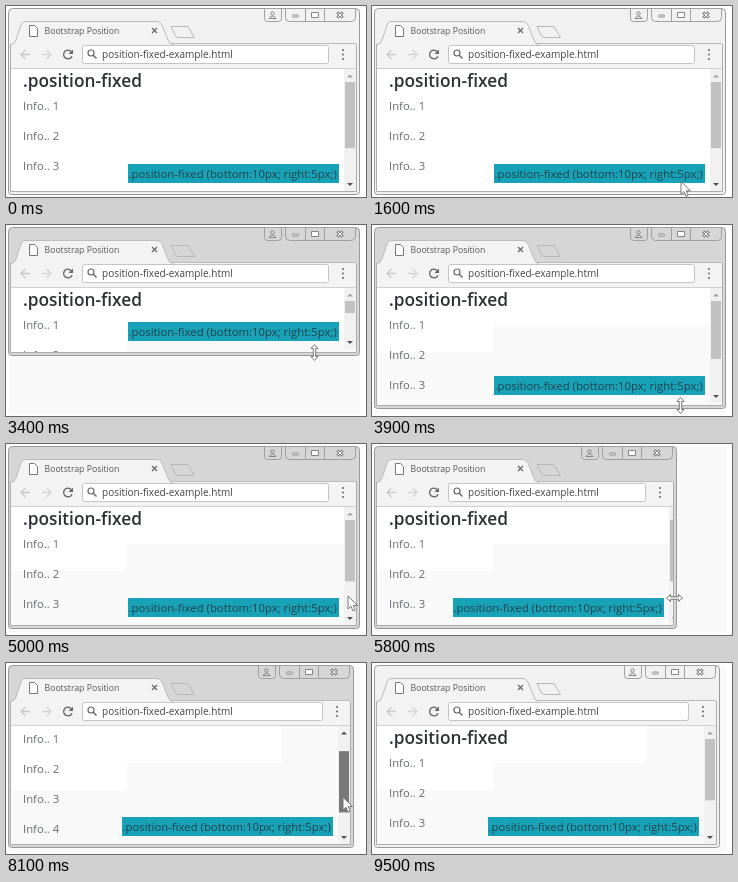
Recreate the animation shown at these times as an HTML page with a canvas. Size 360 by 191 pixels, loop 9600 ms.

```html
<!DOCTYPE html>
<html lang="en">
<head>
<meta charset="utf-8">
<title>Fixed position demo</title>
<style>
  html, body { margin: 0; width: 100%; height: 100%; overflow: hidden; background: #fff; }
  canvas { display: block; width: 100vw; height: 100vh; }
</style>
</head>
<body>
<canvas id="stage"></canvas>
<script>
const LOOP = 9600, STEP = 100, LAG = 40;
const STAGE_W = 360, STAGE_H = 191;
const FONT = '"Open Sans", "Noto Sans", sans-serif';
const OFF_WHITE = '#f9f9f9';
const canvas = document.getElementById('stage');
const ctx = canvas.getContext('2d');
const scale = Math.max(1, window.devicePixelRatio || 1);
canvas.width = STAGE_W * scale;
canvas.height = STAGE_H * scale;

// Smooth move from a to b between two times, at rest outside them.
function glide(t, start, end, a, b) {
  const u = Math.min(1, Math.max(0, (t - start) / (end - start)));
  return a + (b - a) * u * u * (3 - 2 * u);
}
const within = (t, from, to) => t >= from && t < to;

const bottomAt = t => Math.round(t < 3300 ? glide(t, 2500, 3150, 189, 127) : glide(t, 3300, 3950, 127, 185));
const rightAt = t => Math.round(t < 6100 ? glide(t, 5500, 5930, 354, 291) : glide(t, 6100, 6750, 291, 348));
const scrollAt = t => t < 7900 ? glide(t, 7300, 7800, 0, 36) : glide(t, 7900, 8400, 36, 0);

function arrowAt(t) {
  const move = (start, end, [x0, y0], [x1, y1]) => [glide(t, start, end, x0, x1), glide(t, start, end, y0, y1)];
  if (t < 2100) return move(700, 1700, [343, 120], [308, 177]);
  if (t < 5200) return move(3900, 4700, [308, 181], [342, 152]);
  if (t < 8600) return move(6900, 7200, [345, 150], [337, 122]);
  return move(8600, 9000, [337, 122], [362, 121]);
}

function rect(x, y, w, h, fill) {
  ctx.fillStyle = fill;
  ctx.fillRect(x, y, w, h);
}
function shape(d, fill, stroke, width = 1) {
  const path = typeof d === 'string' ? new Path2D(d) : d;
  if (fill) { ctx.fillStyle = fill; ctx.fill(path); }
  if (stroke) { ctx.strokeStyle = stroke; ctx.lineWidth = width; ctx.stroke(path); }
}
function rounded(x, y, w, h, radius, fill, stroke) {
  const path = new Path2D();
  path.roundRect(x, y, w, h, radius);
  shape(path, fill, stroke);
}
function arc(x, y, r, fill, stroke, width, from = 0, to = 2 * Math.PI) {
  const path = new Path2D();
  path.arc(x, y, r, from, to);
  shape(path, fill, stroke, width);
}
function text(str, x, y, size, color, weight = 400) {
  ctx.font = `${weight} ${size}px ${FONT}`;
  ctx.fillStyle = color;
  ctx.fillText(str, x, y);
}
function cross(x, y, r, color, width) {
  shape(`M${x - r} ${y - r}l${2 * r} ${2 * r}m0 ${-2 * r}l${-2 * r} ${2 * r}`, null, color, width);
}

function drawControls(right, frame) {
  const edge = '#a0a0a0', ink = '#858585';
  rounded(right - 95.5, 2.5, 17, 13, [0, 0, 3, 3], frame, edge);
  arc(right - 87.5, 7.5, 1.7, null, ink);
  shape(`M${right - 91} 12.5q3.5 -5 7 0z`, null, ink);
  rounded(right - 74.5, 2.5, 70, 13, [0, 0, 4, 4], frame, edge);
  shape(`M${right - 54.5} 3v12m19 0v-12`, null, edge);
  rounded(right - 67.5, 9, 6, 2, 1, '#fff', ink);
  rounded(right - 48.5, 6.5, 7, 5, 0, '#fff', ink);
  cross(right - 20, 9, 2.8, ink, 3);
  cross(right - 20, 9, 2.3, '#fff', 1);
}

function drawTab(frame) {
  shape('M5 38.5Q9 38 10 34L15 19Q16 15.5 19 15.5H151Q154 15.5 156 19L162 34Q163 38 167 38.5', '#f3f3f3', '#bcbcbc');
  shape('M165 20.5H182L188.5 31.5H172Q170 31 169 29Z', frame, '#b8b8b8');
  shape('M23.5 19.5h5l3 3v8h-8z', '#fff', '#777');
  text('Bootstrap Position', 38.5, 28, 8.7, '#555');
  cross(148.5, 24.5, 2.5, '#666', 1.2);
}

function drawToolbar(right) {
  rect(5, 38, right - 9, 25, '#f3f3f3');
  shape('M24 48.5h-9m4.5 -4.5l-4.5 4.5l4.5 4.5', null, '#cacaca', 1.3);
  shape('M36 48.5h9m-4.5 -4.5l4.5 4.5l-4.5 4.5', null, '#d4d4d4', 1.3);
  arc(62, 48.5, 4.3, null, '#666', 1.4, 0.4, 5.5);
  shape('M67 43.5v4.5h-4.5z', '#666');
  rounded(76.5, 39.5, right - 108, 18, 2, '#fff', '#c4c4c4');
  arc(85, 47, 3, null, '#666', 1.2);
  shape('M87.2 49.2l3.3 3.3', null, '#666', 1.4);
  text('position-fixed-example.html', 96, 52, 10, '#444');
  for (let i = 0; i < 3; i++) arc(right - 17, 44 + 4.5 * i, 1, '#666');
  rect(5, 62, right - 9, 1, '#d0d0d0');
}

function drawPage(t, right, bottom, scroll) {
  rect(5, 63, right, bottom, t < 3400 ? '#fff' : OFF_WHITE);
  rect(5, 63, (t < 6000 ? right - 16 : 275) - 5, 37, '#fff');
  rect(5, 100, 116, 27, '#fff');

  text('.position-fixed', 17, 81 - scroll, 17.3, '#2d3135', 600);
  for (let i = 0; i < 5; i++) text(`Info.. ${i + 1}`, 17, 103.5 + 30 * i - scroll, 11.3, '#666b70');

  const left = right - 232, top = bottom - 31;
  rect(left, top, 211, 19, '#17a2b8');
  text('.position-fixed (bottom:10px; right:5px;)', left + 0.5, top + 13.5, 11.33, '#21404a');
}

function drawScrollbar(t, right, bottom, thumbShift) {
  const x = right - 16, mid = x + 6;
  const thumb = (bottom - 93) * (bottom - 67) / 177;
  const pressed = within(t, 7400, 8500);
  const hovered = within(t, 800, 1100) || within(t, 7100, 8800);
  rect(x, 63, 12, bottom - 67, '#f1f1f1');
  rect(x + 1, 76 + thumbShift, 10, thumb, pressed ? '#787878' : hovered ? '#a8a8a8' : '#c1c1c1');
  shape(`M${mid - 3} 71.5h6l-3 -3z`, thumbShift > 0 ? '#505050' : '#a3a3a3');
  shape(`M${mid - 3} ${bottom - 12}h6l-3 3z`, '#505050');
}

function drawCursor(d, x, y, angle = 0) {
  ctx.save();
  ctx.translate(x, y);
  ctx.rotate(angle);
  shape(d, '#fff', '#6a6a6a', 0.9);
  ctx.restore();
}

function drawPointer(t, right, bottom, thumbShift) {
  const resize = 'M0 -8L3.5 -4H1.2V4H3.5L0 8L-3.5 4H-1.2V-4H-3.5Z';
  if (within(t, 2100, 4000)) {
    drawCursor(resize, 308.5, bottom - 3.5);
  } else if (within(t, 5200, 7000)) {
    drawCursor(resize, right - 2.5, t < 5600 ? 156 : 154, Math.PI / 2);
  } else if (within(t, 800, 9000)) {
    const [x, y] = arrowAt(t);
    drawCursor('M0 0V13L3 10.2L5 15L7.2 14L5.2 9.5H9.4Z', x, y + thumbShift);
  }
}

function draw(t) {
  const right = rightAt(t), bottom = bottomAt(t), scroll = scrollAt(t);
  const thumbShift = scroll * (bottom - 93) / 177;
  const frame = within(t, 2500, 9500) ? '#d6d6d6' : '#f1f1f1';
  ctx.setTransform(scale, 0, 0, scale, 0, 0);
  rect(0, 0, STAGE_W, STAGE_H, '#fff');
  rect(3, 3, 351, 186, OFF_WHITE);
  rounded(2.5, 2.5, right - 3, bottom - 3, [4, 4, 3, 3], frame, '#999');
  drawControls(right, frame);
  drawToolbar(right);
  shape(`M164 37.5H${right - 4}`, null, '#bcbcbc');
  drawTab(frame);

  // The page is laid out slightly later than the window frame moves.
  const pageRight = rightAt(t - LAG), pageBottom = bottomAt(t - LAG);
  ctx.save();
  ctx.beginPath();
  ctx.rect(5, 63, right - 9, bottom - 67);
  ctx.clip();
  drawPage(t, pageRight, pageBottom, scroll);
  drawScrollbar(t, pageRight, pageBottom, thumbShift);
  ctx.restore();

  shape(`M4.5 38V${bottom - 3.5}H${right - 3.5}V38`, null, '#adadad');
  drawPointer(t, right, bottom, thumbShift);
}

const start = performance.now();
function tick() {
  const t = Math.max(0, performance.now() - start) % LOOP;
  draw(Math.floor(t / STEP) * STEP);
  requestAnimationFrame(tick);
}
tick();
</script>
</body>
</html>
```
